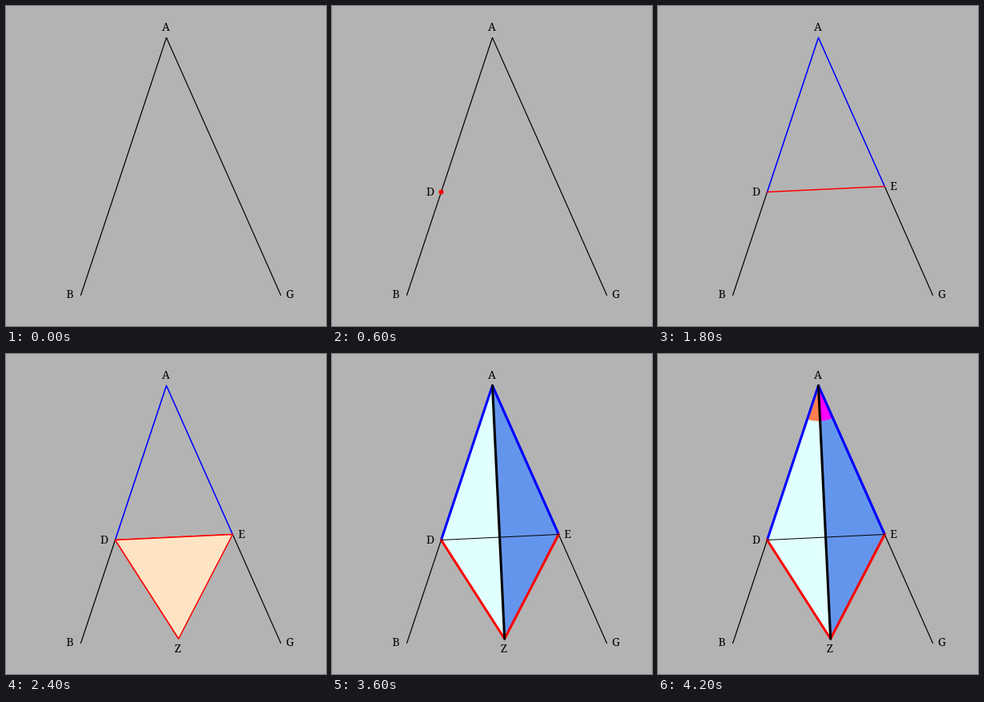
These frames come from a looping animation (400x400 px, 4800 ms). An HTML page:

```html
<!DOCTYPE html>
<html lang="en">
<head>
<meta charset="utf-8">
<title>Bisecting an angle</title>
<style>
  html, body { margin: 0; width: 100%; height: 100%; overflow: hidden; background: #b3b3b3; }
  svg { display: block; width: 100vw; height: 100vh; }
  text { font: 14px "Noto Serif", "DejaVu Serif", serif; text-anchor: middle; }
  path { stroke-linecap: round; stroke-linejoin: round; }
  .thin, .mid, .bold { fill: none; }
  .thin { stroke: #000; stroke-width: 1.2; }
  .mid { stroke-width: 1.6; }
  .bold { stroke-width: 3.1; }
  .blue { stroke: #00f; }
  .red { stroke: #f00; }
  .black { stroke: #000; }
  .dot { fill: #f00; }

  /* Eight steps of 600 ms; groups nest to limit both ends of a range. */
  [class^="from"], [class^="until"] { animation: 4.8s step-end infinite; }
  .from1 { animation-name: from1; }
  .from2 { animation-name: from2; }
  .from3 { animation-name: from3; }
  .from4 { animation-name: from4; }
  .from5 { animation-name: from5; }
  .from6 { animation-name: from6; }
  .from7 { animation-name: from7; }
  .until2 { animation-name: until2; }
  .until3 { animation-name: until3; }
  .until6 { animation-name: until6; }
  @keyframes from1 { 0% { opacity: 0 } 12.5%, 100% { opacity: 1 } }
  @keyframes from2 { 0% { opacity: 0 } 25%, 100% { opacity: 1 } }
  @keyframes from3 { 0% { opacity: 0 } 37.5%, 100% { opacity: 1 } }
  @keyframes from4 { 0% { opacity: 0 } 50%, 100% { opacity: 1 } }
  @keyframes from5 { 0% { opacity: 0 } 62.5%, 100% { opacity: 1 } }
  @keyframes from6 { 0% { opacity: 0 } 75%, 100% { opacity: 1 } }
  @keyframes from7 { 0% { opacity: 0 } 87.5%, 100% { opacity: 1 } }
  @keyframes until2 { 0% { opacity: 1 } 25%, 100% { opacity: 0 } }
  @keyframes until3 { 0% { opacity: 1 } 37.5%, 100% { opacity: 0 } }
  @keyframes until6 { 0% { opacity: 1 } 75%, 100% { opacity: 0 } }
</style>
</head>
<body>
<svg viewBox="0 0 400 400">
  <defs>
    <path id="left" d="M200.5 39.5 136.5 232.5 215.7 356Z"/>
    <path id="right" d="M200.5 39.5 283.3 225.5 215.7 356Z"/>
    <path id="arms" d="M136.5 232.5 200.5 39.5 283.3 225.5"/>
    <clipPath id="inLeft"><use href="#left"/></clipPath>
    <clipPath id="inRight"><use href="#right"/></clipPath>
  </defs>

  <path class="thin" d="M93.5 361.5 136.5 232.5M283.3 225.5 343.5 361.5"/>
  <g class="until2"><use href="#arms" class="thin"/></g>
  <text x="200" y="31">A</text>
  <text x="80" y="365">B</text>
  <text x="355" y="365">G</text>

  <g class="until6">
    <g class="from2"><use href="#arms" class="mid blue"/></g>
    <g class="from3"><path class="mid red" d="M136.5 232.5 283.3 225.5"/></g>
    <g class="from4"><path class="mid red" style="fill:#ffe4c4" d="M136.5 232.5 283.3 225.5 215.7 356Z"/></g>
    <g class="from5"><path class="mid black" d="M200.5 39.5 215.7 356"/></g>
  </g>

  <g class="until3">
    <g class="from1"><circle class="dot" cx="136.5" cy="232.5" r="3"/></g>
    <g class="from2"><circle class="dot" cx="283.5" cy="225.5" r="3"/></g>
  </g>

  <g class="from6">
    <use href="#left" fill="#e0ffff"/>
    <use href="#right" fill="#6495ed"/>
    <g class="from7">
      <circle cx="200.5" cy="39.5" r="44.5" fill="#ff7f50" clip-path="url(#inLeft)"/>
      <circle cx="200.5" cy="39.5" r="44.5" fill="#f0f" clip-path="url(#inRight)"/>
    </g>
    <use href="#arms" class="bold blue"/>
    <path class="bold red" d="M136.5 232.5 215.7 356 283.3 225.5"/>
    <path class="thin" d="M136.5 232.5 283.3 225.5"/>
    <path class="bold black" d="M200.5 39.5 215.7 356"/>
  </g>

  <text class="from1" x="123" y="237">D</text>
  <text class="from2" x="294.5" y="230">E</text>
  <text class="from4" x="215" y="373">Z</text>
</svg>
</body>
</html>
```
